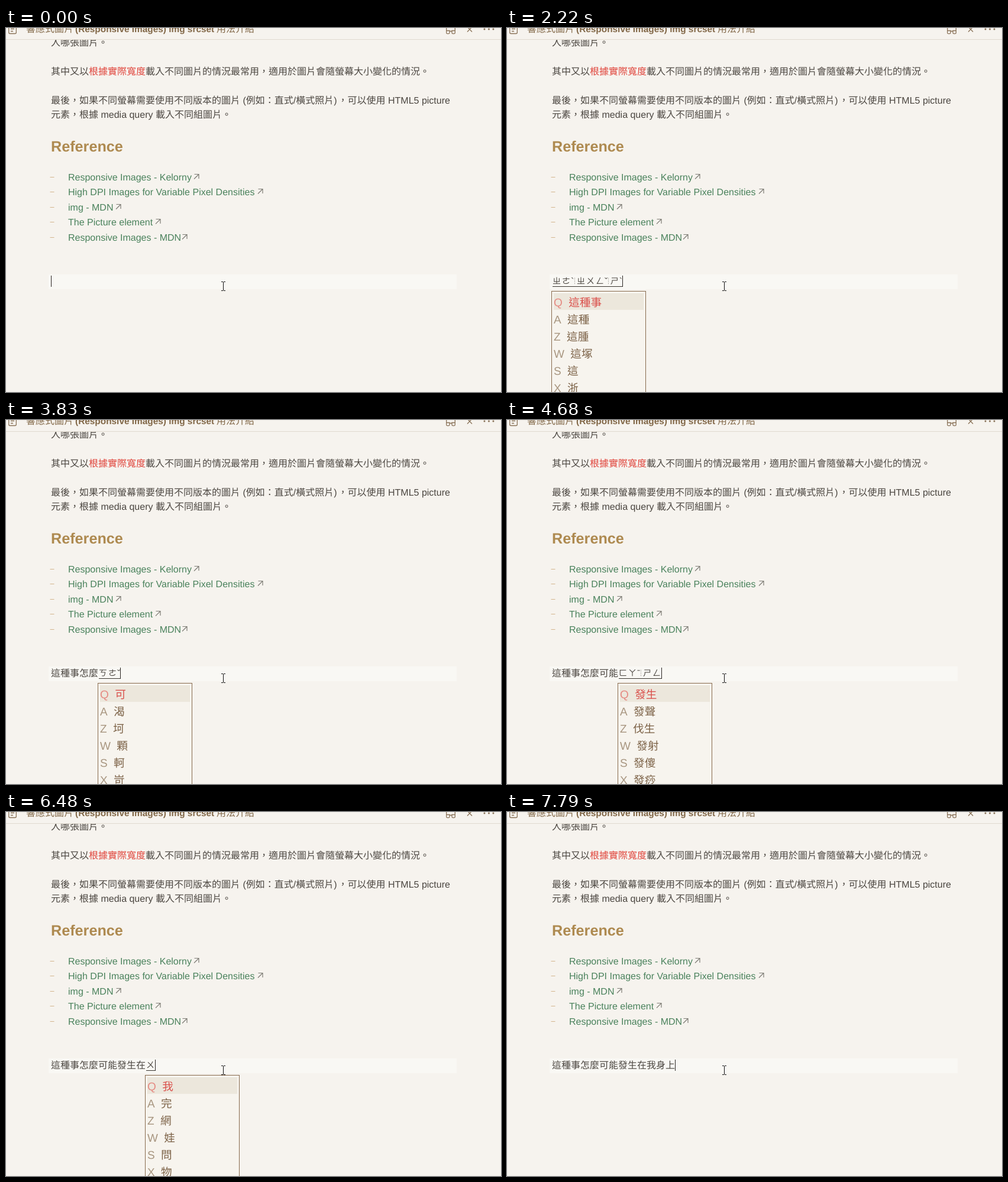
An HTML page that plays this animation: 837x616 px, repeating every 8000 ms.

```html
<!DOCTYPE html>
<html lang="zh-Hant">
<head>
<meta charset="utf-8">
<title>Note editor</title>
<style>
  html, body { margin: 0; width: 100%; height: 100%; overflow: hidden; background: #f6f3ee; }
  svg { display: block; width: 837px; height: 616px; }
  text {
    font: 300 16px "Liberation Sans", "Noto Sans CJK TC", "Noto Sans CJK", sans-serif;
    fill: #4b4640;
    text-rendering: geometricPrecision;
  }
  .title { fill: #826848; font-weight: 500; }
  .latin { font-size: 15.4px; font-weight: 700; }
  .strong { fill: #e0453c; font-weight: 500; }
  .heading { font-size: 25.2px; font-weight: 700; fill: #ae8a50; }
  .link { fill: #4a825c; }
  .icon { fill: none; stroke: #8a7359; stroke-width: 1.3; }
  .phonetic { font-size: 14px; }
  .row { font-size: 18.67px; font-weight: 500; fill: #7d6348; }
  .key { font-size: 19px; font-weight: 400; fill: #a89680; }
  .row.top { fill: #da514c; }
  .top .key { fill: #e58a82; }
</style>
</head>
<body>
<svg viewBox="0 0 837 616">
  <rect width="837" height="616" fill="#f6f3ee"/>
  <text x="76" y="30">入哪張圖片。</text>
  <rect width="837" height="19" fill="#f6f3ee"/>
  <path d="M0 19.5H837" stroke="#e0dacf"/>

  <text class="title" x="34" y="7">響應式圖片</text>
  <text class="title latin" x="117" y="7">(Responsive Images) img srcset</text>
  <text class="title" x="356" y="7">用法介紹</text>
  <path class="icon" d="M4.7 -3V7.5Q4.7 9.5 6.7 9.5H15.3Q17.3 9.5 17.3 7.5V-3M8 1.5H14M8 5.5H12"/>
  <path class="icon" d="M744.7 -3V8Q744.7 9.7 746.4 9.7H748.2Q750 9.7 750 8V4.5H744.7M759.3 -3V8Q759.3 9.7 757.6 9.7H755.8Q754 9.7 754 8V4.5H759.3M750 5.5H754"/>
  <path class="icon" d="M780 -2L788 6.5M788 -2L780 6.5"/>
  <g fill="#8a7359"><circle cx="809" cy="2" r="1.5"/><circle cx="816.5" cy="2" r="1.5"/><circle cx="824" cy="2" r="1.5"/></g>

  <text x="76" y="79">其中又以<tspan class="strong">根據實際寬度</tspan>載入不同圖片的情況最常用，適用於圖片會隨螢幕大小變化的情況。</text>
  <text x="76" y="128">最後，如果不同螢幕需要使用不同版本的圖片 (例如：直式/橫式照片)<tspan dx="2">，可以使用 HTML5 picture</tspan></text>
  <text x="76" y="152">元素，根據 media query 載入不同組圖片。</text>
  <text class="heading" x="76" y="209">Reference</text>
  <g id="links"></g>

  <rect x="72" y="417" width="690" height="25" fill="#f9f8f4"/>
  <g id="editor"></g>
  <path d="M364 429.5H367M368 429.5H371M367.5 430V444M364 444.5H367M368 444.5H371" fill="none" stroke="#111"/>
</svg>
<script>
const LOOP = 8000, LEFT = 76;
const SENTENCE = "這種事怎麼可能發生在我身上";
const KEYS = "QAZWSX";

// Label and x of the outgoing arrow
const links = [
  ["Responsive Images - Kelorny", 318],
  ["High DPI Images for Variable Pixel Densities", 426],
  ["img - MDN", 186],
  ["The Picture element", 253],
  ["Responsive Images - MDN", 298],
];
document.getElementById("links").innerHTML = links.map(([label, x], i) => {
  const y = Math.round(258 + i * 25.4);
  return `<path d="M74.5 ${y - 5.5}h7" stroke="#d3b58d"/>
    <text class="link" x="105" y="${y}">${label}</text>
    <path d="M${x} ${y - 2.5}l8 -8M${x + 0.5} ${y - 10.5}h7.5v7.5" fill="none" stroke="#7f7d76" stroke-width="1.2"/>`;
}).join("");

// Start time, committed characters, text being composed ("|" divides syllables), candidates
const states = [
  [-380, 0, ""],
  [400, 0, "5"],
  [710, 0, ""],
  [920, 0, "ㄓ", "這 張 只 中 著 之"],
  [1040, 0, "ㄓㄜ", "這 者 著 折 哲 遮"],
  [1170, 0, "ㄓㄜ`", "這 浙 蔗 柘 鷓 宅"],
  [1300, 0, "ㄓㄜ`|ㄓ", "這種 這張 這招 宅兆 這針 這隻"],
  [1390, 0, "ㄓㄜ`|ㄓㄨ", "這種 這裝 這桌 這磚 這豬 這樁"],
  [1450, 0, "ㄓㄜ`|ㄓㄨㄥ", "這種 這中 這鐘 這重 這終 這眾"],
  [1480, 0, "ㄓㄜ`|ㄓㄨㄥˇ", "這種 這腫 這塚 這踵 這 浙"],
  [1540, 0, "ㄓㄜ`|ㄓㄨㄥˇ|ㄕ", "這種事 這種 這腫 這塚 這 浙"],
  [2100, 0, "ㄓㄜ`|ㄓㄨㄥˇ|ㄕ`", "這種事 這種 這腫 這塚 這 浙"],
  [2250, 3, ""],
  [3000, 3, "ㄗ", "自 再 增 在 字 砸"],
  [3020, 3, "ㄗㄣ", "怎 譖 針 枕 真 鎮"],
  [3080, 3, "ㄗㄣˇ", "怎 枕 診 疹 整 準"],
  [3110, 3, "ㄗㄣˇ|ㄇ", "怎麼 怎沒 怎能 枕木 怎 枕"],
  [3260, 3, "ㄗㄣˇ|ㄇㄜ", "怎麼 怎嗎 怎末 枕麼 怎 枕"],
  [3280, 3, "ㄗㄣˇ|ㄇㄜ˙", "怎麼 怎嚜 怎末 枕麼 怎 枕"],
  [3530, 5, ""],
  [3680, 5, "ㄎ", "可 看 開 快 口 考"],
  [3740, 5, "ㄎㄜ", "可 科 課 克 客 刻"],
  [3830, 5, "ㄎㄜˇ", "可 渴 坷 顆 軻 岢"],
  [3950, 5, "ㄎㄜˇ|ㄋ", "可能 可念 可拿 可怒 可 渴"],
  [3970, 5, "ㄎㄜˇ|ㄋㄥ", "可能 渴能 坷能 顆能 可 渴"],
  [4120, 7, ""],
  [4360, 7, "ㄈ", "發 分 方 非 反 法"],
  [4450, 7, "ㄈㄚ", "發 法 罰 髮 乏 伐"],
  [4540, 7, "ㄈㄚˉ", "發 伐 醱 砝 筏 閥"],
  [4600, 7, "ㄈㄚˉ|ㄕ", "發生 發射 發燒 發聲 發售 發傻"],
  [4680, 7, "ㄈㄚˉ|ㄕㄥ", "發生 發聲 伐生 發射 發傻 發痧"],
  [4710, 7, "ㄈㄚˉ|ㄕㄥˉ", "發生 發聲 伐生 發升 發 伐"],
  [4800, 7, "ㄈㄚˉ|ㄕㄥˉ|ㄗ", "發生在 發生 發聲 伐生 發 伐"],
  [4860, 7, "ㄈㄚˉ|ㄕㄥˉ|ㄗㄞ", "發生在 發生 發聲 伐生 發 伐"],
  [4920, 7, "ㄈㄚˉ|ㄕㄥˉ|ㄗㄞ`", "發生在 發生 發聲 伐生 發 伐"],
  [5010, 7, "ㄈㄚˉ|ㄕㄥˉ|ㄗㄞ`|ㄨ", "發生在我 發生 發聲 伐生 發 伐"],
  [5100, 7, "ㄈㄚˉ|ㄕㄥˉ|ㄗㄞ`|ㄨㄛ", "發生在我 發生 發聲 伐生 發 伐"],
  [5160, 7, "ㄈㄚˉ|ㄕㄥˉ|ㄗㄞ`|ㄨㄛˇ", "發生在我 發生 發聲 伐生 發 伐"],
  [5350, 7, "ㄈㄚˉ|ㄕㄥˉ|ㄗㄞ`|ㄨㄛˇ|ㄕ", "發生在我是 發生 發聲 伐生 發 伐"],
  [5780, 7, "ㄈㄚˉ|ㄕㄥˉ|ㄗㄞ`|ㄨㄛˇ", "發生在我 發生 發聲 伐生 發 伐"],
  [6090, 7, "ㄈㄚˉ|ㄕㄥˉ|ㄗㄞ`|ㄨ", "發生在我 發生 發聲 伐生 發 伐"],
  [6120, 7, "ㄈㄚˉ|ㄕㄥˉ|ㄗㄞ`", "發生在 發生 發聲 伐生 發 伐"],
  [6300, 10, ""],
  [6480, 10, "ㄨ", "我 完 網 娃 問 物"],
  [6570, 10, "ㄨㄛ", "我 握 窩 臥 沃 渦"],
  [6660, 10, "ㄨㄛˇ", "我 婐 捰 倭 窩 握"],
  [7090, 10, "ㄨㄛˇ|ㄕ", "我是 我說 我剩 我甚 我 婐"],
  [7150, 10, "ㄨㄛˇ|ㄕㄣ", "我身 我深 我神 我甚 我 婐"],
  [7210, 10, "ㄨㄛˇ|ㄕㄣˉ", "我身 我深 我伸 我申 我 婐"],
  [7270, 10, "ㄨㄛˇ|ㄕㄣˉ|ㄕ", "我身上 我身 我深 我伸 我 婐"],
  [7330, 10, "ㄨㄛˇ|ㄕㄣˉ|ㄕㄤ", "我身上 我身 我深 我伸 我 婐"],
  [7390, 10, "ㄨㄛˇ|ㄕㄣˉ|ㄕㄤ`", "我身上 我身 我深 我伸 我 婐"],
  [7760, 13, ""],
];

const advance = ch => ch === "|" ? 3.6 : ch === "5" ? 9 : "`ˇˉ˙".includes(ch) ? 5.33 : 16;

function composition(text, start) {
  let x = start, glyphs = "";
  for (const ch of text) {
    const width = advance(ch);
    if (ch === "|") {
      glyphs += `<path d="M${Math.round(x + 1)}.5 423v12" stroke="#77736c" stroke-dasharray="1 2"/>`;
    } else if (width === 16) {
      glyphs += `<text class="phonetic" x="${x + 1}" y="433">${ch}</text>`;
    } else {
      glyphs += `<text x="${x}" y="434">${ch}</text>`;
    }
    x += width;
  }
  return { glyphs, end: Math.floor(x + 0.3) };
}

function popup(words, x) {
  const rows = words.split(" ").map((word, i) =>
    `<text class="row${i ? "" : " top"}" x="${x + 4}" y="${471 + i * 29}"><tspan class="key">${KEYS[i]}</tspan>\u00a0\u00a0${word}</text>`);
  return `<rect x="${x + 0.5}" y="445.5" width="159" height="200" fill="#f7f4ee" stroke="#876a4d"/>
    <rect x="${x + 4}" y="449" width="152" height="28" fill="#ece7dc"/>${rows.join("")}`;
}

function render([, count, text, words], caretOn) {
  const start = LEFT + count * 16;
  const { glyphs, end } = composition(text, start);
  let out = `<text x="${LEFT}" y="434">${SENTENCE.slice(0, count)}</text>${glyphs}`;
  if (words) out += `<path d="M${start + 1} 437.5H${end}" stroke="#38342f"/>${popup(words, start - 1)}`;
  if (caretOn) out += `<path d="M${end + 0.5} 419V438" stroke="#2a2522"/>`;
  return out;
}

const editor = document.getElementById("editor");
let shown = "";
function frame() {
  const now = performance.now() % LOOP;
  const state = states.findLast(s => s[0] <= now);
  const caretOn = Boolean(state[3]) || (now - state[0]) % 1060 < 530;
  const markup = render(state, caretOn);
  if (markup !== shown) editor.innerHTML = shown = markup;
  requestAnimationFrame(frame);
}
frame();
</script>
</body>
</html>
```
